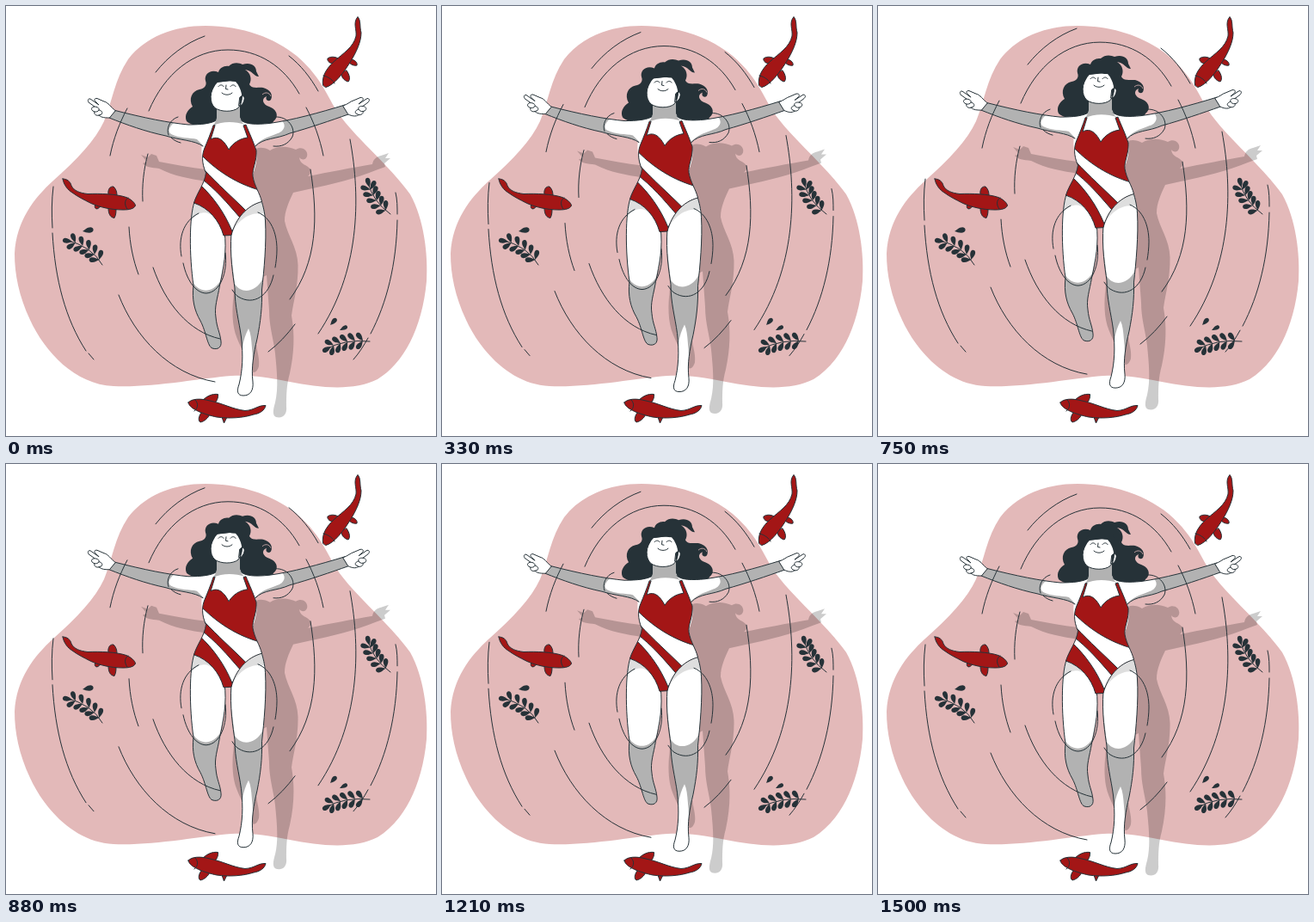
Animation of 500 by 500 pixels, one loop 1540 ms. Source, as an HTML page:

```html
<!DOCTYPE html>
<html lang="en">
<head>
<meta charset="utf-8">
<title>Floating swimmer</title>
<style>
html, body { margin: 0; width: 100%; height: 100%; overflow: hidden; background: #fff; }
svg { display: block; width: 100vw; height: 100vh; }
.ink { fill: #263238; }
.line { fill: none; stroke: #263238; stroke-width: 1; stroke-linecap: round; stroke-linejoin: round; }
.skin { fill: #fff; }
.shade { fill: #b2b2b2; }
.pale { fill: #dedede; }
.red { fill: #a31616; }
.edge { stroke: #263238; stroke-width: 1; stroke-linejoin: round; stroke-linecap: round; }
</style>
</head>
<body>
<svg viewBox="0 0 500 500" xmlns="http://www.w3.org/2000/svg">
  <defs>
    <path id="legL" d="M219 228C213 245 213 290 218 325C216 341 219 354 226 366C233 379 234 396 240 398C246 400 251 397 250 390C249 380 245 374 244 362C242 350 246 340 248.500 325C253 305 257 285 254 262L250 222Z"/>
    <path id="legR" d="M262 264C260 290 264 314 266 328C266 350 271 366 273.500 385C276 407 275 424 271 440C268 448 269 453 276 453C284 453 288 447 287 437C285 420 288 404 292 387C296 367 298 350 297.500 330C300 308 303 275 301.500 250C301 240 299 233 297 226L262 222Z"/>
    <path id="armL" d="M246 132C240 137 226 138 212 138C190 136 160 130 127 121.500L120 130C140 138 162 146 186 151C201 156 220 156 229 163L252 165Z"/>
    <path id="armR" d="M272 132C278 138 291 138 306 136.500C332 133 365 124 394 115L398 126C378 133 352 142 330 148C315 155 299 153 290 163L262 165Z"/>
    <path id="suit" d="M243 139L238 155C247 150 254 157 259 167C264 159 272 154 281 153L276 139L279 138C283 148 287 156 291 168C292 180 286 190 287 198C289 210 295 217 297.500 227.500C280 232 267 247 262 266.500L253 267C248 249 236 235 218.500 229C222 217 231 207 232.500 194C227 182 228 172 231 165C234 158 238 148 241 139Z"/>
    <clipPath id="cutSuit"><use href="#suit"/></clipPath>
    <clipPath id="cutLegL"><use href="#legL"/></clipPath>
    <clipPath id="cutLegR"><use href="#legR"/></clipPath>
    <clipPath id="cutArmL"><use href="#armL"/></clipPath>
    <clipPath id="cutArmR"><use href="#armR"/></clipPath>
  </defs>

  <rect width="500" height="500" fill="#fff"/>
  <path fill="#e3b9b9" d="M232 23C275 23 312 37 338 58C371 87 372 106 391 131C410 156 446 186 470 219C486 248 491 288 489 320C484 375 462 416 432 434C405 448 365 444 330 437C300 431 285 429 262 430C225 433 170 444 125 442C80 440 45 402 28 365C15 337 10 312 10 288C12 250 32 224 55 203C82 179 104 156 114 134C124 110 126 86 142 62C162 36 195 23 232 23Z"/>

  <g id="sprigs" class="ink"></g>

  <g id="fish" class="red edge">
    <path d="M119 219.500C118 213 121 209.500 125 210C128 213 129 216 129 220ZM119 235.500C119 241 121 246 126 246.500C128 243 128 239 128 236ZM104 230C102 234 104 237 107 235.500L111 232Z"/>
    <path d="M66 201C71 201 75 204 76 209C79 215 86 217.500 95 218.500C110 218 128 218.500 140 222.500C146 225 150 229 150.500 232C149 236 143 237 136 237C122 237 109 234 99 229.500C90 225 84 222 77 217C72 214 67 208 66 201Z"/>
    <path d="M228 459.500C232 454 240 450.500 246.500 451.500C247 456 245 460 242 462ZM227 473C224 477 223 482 226 484C231 483 235 479 237 475ZM251 478L253.500 485L256.500 479Z"/>
    <path d="M212 461C216 456.500 226 456 237 459C252 462 264 469 278 470.500C289 470 293 464 302 464.500C301 470 295 474 288 475C276 479 259 480 245 478C231 475 213 469 212 461Z"/>
    <path d="M383 67C377 68 373 64 374 61C378 58 384 59 388 62ZM390 77C389 82 393 87 398 88C401 85 399 79 396 75ZM402 62C406 63 409 66 408 69C405 70 401 68 399 66Z"/>
    <path d="M368.500 92C367 82 372 73 382 64C392 55 404 48 407 35C408 27 403 20 409 12.500C413 17 411 24 413 31C413 42 407 54 401 64C393 77 382 92 372 94.500Z"/>
    <path class="line" d="M142 223C137 226 138 232 141 236M220 458C225 463 222 469 219 471M369 81C375 82 381 87 382 90"/>
  </g>

  <g id="float">
    <path opacity=".2" d="M286 170C291 163 300 164 307 168C316 162 329 163 337 167C344 162 352 168 350 175C348 180 343 179 341 176C342 185 350 184 354 190C356 194 352 197 351 198C375 193 403 188 426 184C427 178 431 175 436 174L445 171L441 177L447 177L440 183L441 187L430 191C406 201 380 207 352 213L334 217C329 228 324 238 324 250C327 266 339 281 339.500 301C340 326 334 344 332 360C336 382 335 404 330 427C326 441 326 453 326 466C327 475 322 480 314 478C309 476 311 468 313 461C317 444 315 425 313 404C311 387 306 373 306 354L303 313L297 316C293 340 298 362 293 380C287 394 296 405 294 419C291 429 285 427 282 420C279 404 268 391 265 374C262 357 264 340 266 326L270 180Z"/>
    <path opacity=".2" d="M157 173L165 176L169 172L175 174L178 181C196 184 214 188 233 190V204C215 201 195 198 178 189C169 188 162 187 159 183L164 181Z"/>

    <g id="legs">
      <use href="#legL" class="shade"/>
      <g clip-path="url(#cutLegL)">
        <path class="pale" d="M212 220H258V270H212Z"/>
        <path class="skin" d="M210 262C216 240 232 235 242 246C250 256 257 268 257 280L249 320C240 334 225 334 217 321Z"/>
      </g>
      <use href="#legL" class="line"/>
      <use href="#legR" class="shade"/>
      <g clip-path="url(#cutLegR)">
        <path class="pale" d="M258 220H304V275H258Z"/>
        <path class="skin" d="M260 275C264 250 284 237 304 242V300L298 318C291 332 274 336 266 323ZM282 375C275 388 274 402 273 415L264 458H292L289 420C285 405 287 385 282 375Z"/>
      </g>
      <use href="#legR" class="line"/>
    </g>

    <path class="ink" d="M240 137C231 141 216 140 210 134C207 127 211 121 217 117C212 108 216 99 225 97C231 96 234 92 232 87C230 79 238 73 247 77C248 72 254 69 259 70C264 65 271 66 275 68C284 65 291 69 291 76L294 82C288 82 287 75 278 74C285 78 286 86 283 91C286 97 293 94 299 95C307 97 311 103 308 109C305 112 301 109 303 105C296 108 299 115 306 117C315 120 318 129 311 134C310 139 298 140 289 137L272 142H246Z"/>
    <path fill="none" stroke="#e3b9b9" stroke-width=".8" d="M308 105C306 100 301 100 298 103"/>

    <g id="arms">
      <path class="skin" d="M228 160C226 174 229 185 233 195C231 210 221 219 219 229L262 240L297 227C294 213 287 207 287 196C292 183 293 172 289 160L272 130H246Z"/>
      <use href="#armL" class="skin"/>
      <path class="shade" clip-path="url(#cutArmL)" d="M110 112L200 133C190 138 187 146 192 149C201 154 214 153 222 155L231 164L100 150Z"/>
      <use href="#armR" class="skin"/>
      <path class="shade" clip-path="url(#cutArmR)" d="M410 106L320 133C327 138 323 146 316 148C308 152 299 152 288 164L330 170L410 140Z"/>
      <path class="line" d="M246 132C240 137 226 138 212 138C190 136 160 130 127 121.500M120 130C140 138 162 146 186 151C201 156 220 156 229 163M272 132C278 138 291 138 306 136.500C332 133 365 124 394 115M398 126C378 133 352 142 330 148C315 155 299 153 290 163"/>
      <path class="skin edge" d="M127 121.500C122 118 119 112 114 111L106 107.500C103 107 102 109 104 111L108 115L98 108C95 107.500 95 110 96 112L103 117C100 117 98 120 101 122L103 123C102 126 105 128 108 127C111 130 116 130 120 130Z"/>
      <path class="line" d="M103 117C106 117 109 119 108 121C107 123 105 123 103 123M108 121C111 121 113 124 111 126L108 127"/>
      <path class="skin edge" d="M392 116C398 114 400 111 405 109.500L412 106.500C416 106 416 109 414 110.500L410 114L420 107.500C423 107.500 423 110 421 112L415 116.500C419 117 420 120 417 122L415 122.500C416 125 413 127 410 126.500C407 129 402 128 398 126Z"/>
      <path class="line" d="M415 116.500C411 116 409 118 410 120C411 122 413 123 415 122.500M410 120C407 121 405 123 407 125L410 126.500"/>
    </g>

    <path class="shade" d="M245 116V130C244 135 242 137 241 139C251 134 266 134 278 138C274 136 272 132 272 128V114Z"/>

    <g id="swimsuit">
      <use href="#suit" class="red"/>
      <g class="skin edge" clip-path="url(#cutSuit)">
        <path d="M225 171C243 190 268 208 302 216V237L279 238C263 222 247 208 230 190Z"/>
        <path d="M226 200C244 213 258 230 272 246L263 262C254 240 241 222 225 207Z"/>
      </g>
      <use href="#suit" class="line"/>
    </g>

    <g id="head">
      <path class="skin edge" d="M272 106C275 103 278 105 277 109C276 114 273 116 271 116ZM243 89C237 100 236 112 243 118.500C250 123.500 264 123.500 270 118.500C277 111 275 96 270 86Z"/>
      <path class="ink" d="M239 101C239 93 242 86 245 82H273C276 90 276 99 274.500 103C273 98 271 92 267 88C260 88 253 85 248 87C243 91 241 96 239 101Z"/>
      <path class="line" stroke-width=".8" d="M247 93.500C249 91 252 91.500 253 93.500M261 93.500C263 91 266 91.500 267 93.500M256 92L255.500 96.500L258 97M251 101C254 104 260 104 263 101"/>
    </g>

    <g id="ripples" class="line"></g>
  </g>
</svg>
<script>
const $ = id => document.getElementById(id);
const LOOP = 1540, STEPS = 37, CYCLE = 36, RISE = 10;

const ripples = [
  'M174 77C189 58 209 43 231 35',
  'M166 122C184 79 218 51 258 51C294 51 323 70 341 102',
  'M329 58C343 69 354 83 363 99',
  'M349 118C358 135 365 154 369 174',
  'M141 119C132 136 125 154 121 174',
  'M165 172C160 190 158 209 159 227',
  'M143 257C144 277 148 296 154 312',
  'M171 304C185 345 212 379 249 387',
  'M131 336C150 385 190 428 243 437',
  'M55 210C53 226 53 242 54 258',
  'M54 264C57 318 69 364 93 401M96 404L102 411',
  'M400 155C413 225 411 310 363 381',
  'M354 190C363 246 362 298 330 341',
  'M305 402C317 393 327 382 336 370',
  'M453 217C455 225 455 234 455 242',
  'M455 249C454 300 443 345 424 381M421 386C416 395 411 403 404 411',
  'M200 129C190 132 186 143 189 150M192 153C195 156 199 158 203 159',
  'M313 129C328 128 337 142 333 152C328 161 320 164 311 163',
  'M224 241C206 250 200 270 204 291M206 299C211 322 222 334 233 334C249 333 258 310 255 287',
  'M293 240C308 246 315 264 315 283C315 291 314 298 313 304M311 313C306 337 288 349 270 338C267 336 265 333 263 330'
];
$('ripples').innerHTML = ripples.map(d => `<path d="${d}"/>`).join('');

const leaf = (x, y, deg, size = 1) =>
  `<path transform="translate(${x} ${y}) rotate(${deg}) scale(${size})" d="M0 0C3 -1 5 -3.500 9 -3C12 -2.500 12.500 1 10 2.200C7 3.500 3 1.500 0 0Z"/>`;

// A quadratic stem from base to tip with pairs of leaves along it.
function sprig(base, bend, tip, pairs) {
  const at = (i, u) => (1 - u) ** 2 * base[i] + 2 * u * (1 - u) * bend[i] + u * u * tip[i];
  const slope = (i, u) => (1 - u) * (bend[i] - base[i]) + u * (tip[i] - bend[i]);
  let out = `<path class="line" stroke-width=".8" d="M${base}Q${bend} ${tip}"/>`;
  for (let n = 0; n < pairs; n++) {
    const u = 0.14 + 0.66 * n / (pairs - 1);
    const dir = Math.atan2(slope(1, u), slope(0, u)) * 180 / Math.PI;
    for (const side of [-52, 52]) out += leaf(at(0, u), at(1, u), dir + side);
  }
  const end = Math.atan2(slope(1, 1), slope(0, 1)) * 180 / Math.PI;
  return out + leaf(at(0, 0.86), at(1, 0.86), end);
}

$('sprigs').innerHTML =
  sprig([112, 301], [100, 279], [69, 272], 5) +
  sprig([447, 242], [426, 227], [421, 205], 5) +
  sprig([423, 390], [394, 387], [372, 399], 5) +
  leaf(89, 262, -8, 1.1) + leaf(377, 371, -45, .9) + leaf(388, 377, -25, .85);

function draw(ms) {
  // The small nudge keeps times rounded to 10 ms on their own step.
  const step = Math.floor((ms % LOOP) / LOOP * STEPS + 0.1);
  const p = (step + 1) % CYCLE / CYCLE;
  const lift = RISE * (1 - Math.abs(2 * p - 1));
  $('float').setAttribute('transform', `translate(0 ${(RISE * 2 / CYCLE - lift).toFixed(3)})`);
}

const start = performance.now();
function tick() {
  draw(performance.now() - start);
  requestAnimationFrame(tick);
}
tick();
</script>
</body>
</html>
```
